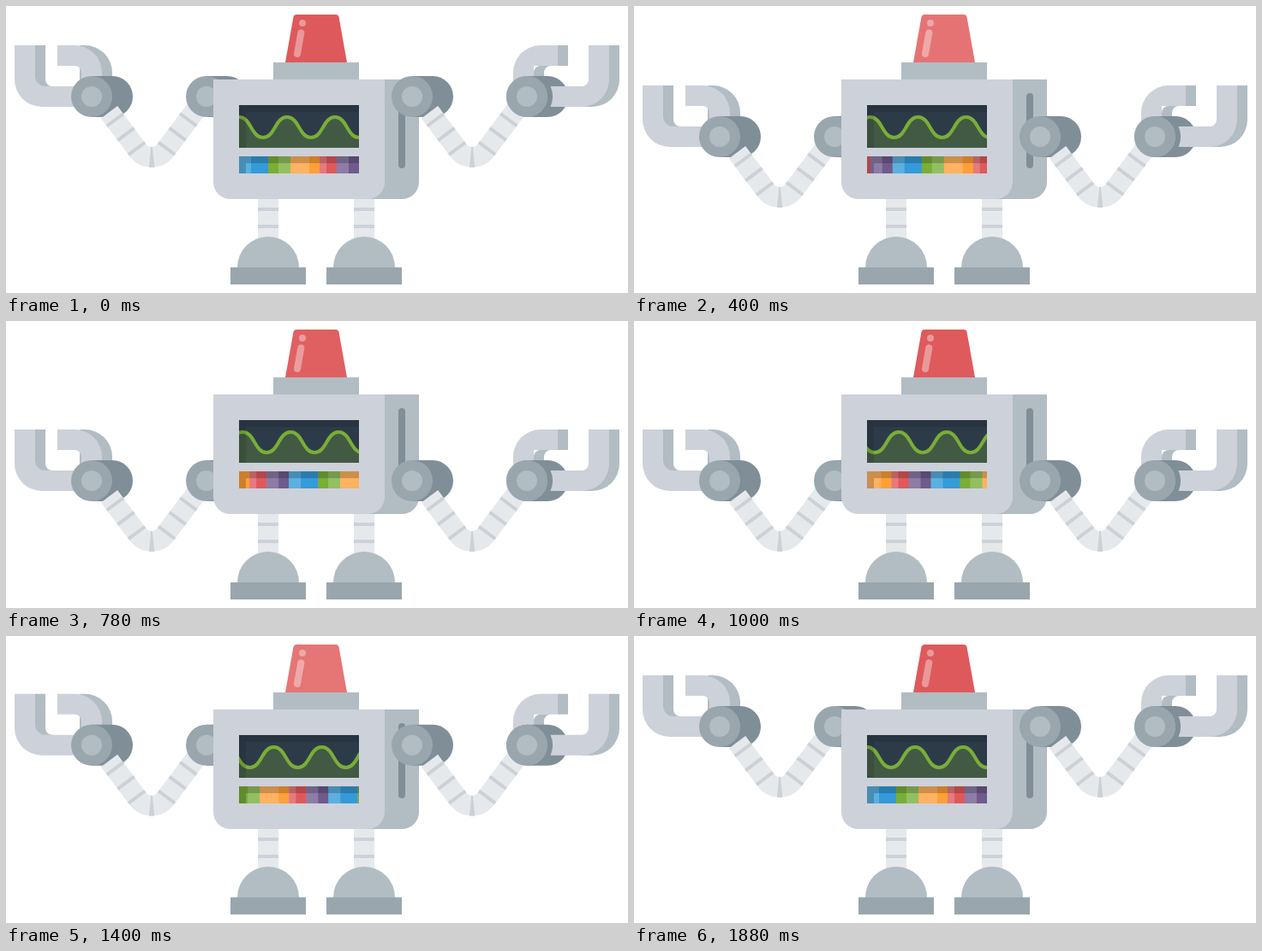
Recreate the animation shown at these times as an HTML page. Size 726 by 336 pixels, loop 1.9 s.

```html
<!DOCTYPE html>
<html lang="en">
<head>
<meta charset="utf-8">
<title>Robot</title>
<style>
  html, body { margin: 0; width: 100%; height: 100%; overflow: hidden; background: #fff; }
  svg { display: block; }
  .light { fill: #cdd1d9; }
  .mid { fill: #b2bcc3; }
  .steel { fill: #99a6ae; }
  .dark { fill: #808e98; }
</style>
</head>
<body>
<svg width="726" height="336" viewBox="0 0 726 336">
  <defs>
    <g id="leg">
      <path fill="#e6e9ec" d="M294 220h24v56h-24z"/>
      <path class="light" d="M294 236h24v4h-24zM294 256h24v4h-24z"/>
      <path class="mid" d="M270 306a36 36 0 0 1 72 0z"/>
      <path class="steel" d="M262 306h88v20h-88z"/>
    </g>
    <path id="pill" class="dark" d="M100 82h24a24 24 0 0 1 0 48h-24z"/>
    <g id="disc">
      <circle class="steel" cx="100" cy="106" r="24"/>
      <circle class="mid" cx="100" cy="106" r="12"/>
    </g>
    <path id="tube" d="M120.5 124.2L154 168.9A20 20 0 0 0 186 168.9L232 107.5"/>
    <g id="limb">
      <use href="#pill"/>
      <use href="#pill" x="134"/>
      <g fill="none" stroke-width="24">
        <use href="#tube" stroke="#e6e9ec"/>
        <use href="#tube" stroke="#cdd1d6" stroke-dasharray="4 17" stroke-dashoffset="-9.4"/>
      </g>
      <use href="#disc"/>
      <use href="#disc" x="134"/>
    </g>
  </defs>

  <g class="arm">
    <path class="mid" d="M34 46H46V86a8 8 0 0 0 8 8V100H34zM86 46H92a32 32 0 0 1 32 32V100H86z"/>
    <path class="light" d="M10 46H34V82a12 12 0 0 0 12 12H100V118H42a32 32 0 0 1-32-32z"/>
    <path class="light" d="M60 46H80a32 32 0 0 1 32 32V100H88V78a8 8 0 0 0-8-8H60z"/>
    <use href="#limb"/>
  </g>

  <use href="#leg"/>
  <use href="#leg" x="112"/>

  <path class="mid" d="M312 66h100v20h-100zM400 86h82v120a20 20 0 0 1-20 20h-62z"/>
  <path class="light" d="M242 86h200v120a20 20 0 0 1-20 20H262a20 20 0 0 1-20-20z"/>
  <rect class="dark" x="458" y="102" width="8" height="88" rx="4"/>

  <path id="lamp" d="M326 66L335.4 13.3Q336 10 339.4 10H384.6Q388 10 388.6 13.3L398 66z"/>
  <g fill="#fff" opacity=".38">
    <circle cx="346" cy="20" r="4"/>
    <path d="M344.3 31.5L340 56" stroke="#fff" stroke-width="8" stroke-linecap="round"/>
  </g>

  <svg x="272" y="116" width="140" height="50">
    <path fill="#2d3b49" d="M0 0h140v50H0z"/>
    <g id="wave">
      <path id="area" fill="#7aae37" fill-opacity=".27"/>
      <path id="line" fill="none" stroke="#7aae37" stroke-width="4"/>
    </g>
    <path opacity=".12" d="M0 0H140V8H8V50H0z"/>
  </svg>
  <svg x="272" y="176" width="140" height="20">
    <g id="bars"></g>
    <path opacity=".2" d="M0 0H140V8H8V20H0z"/>
  </svg>

  <g class="arm">
    <path class="light" d="M644 46H624a32 32 0 0 0-32 32V100H616V70H644z"/>
    <path class="mid" d="M644 46h12v24H636a8 8 0 0 0-8 8v12h-12V78a8 8 0 0 1 8-8h20z"/>
    <use href="#limb" x="374"/>
    <use href="#disc" x="508"/>
    <path class="mid" d="M704 46h12v40a32 32 0 0 1-32 32H672z"/>
    <path class="light" d="M680 46h24v40a32 32 0 0 1-32 32H635.5A30 30 0 0 0 635.5 94H672a8 8 0 0 0 8-8z"/>
  </g>
</svg>
<script>
const $ = id => document.getElementById(id);
const LOOP = 1900, CYCLE = 1880, HALF = CYCLE / 2, STEP = 20;

const curve = "M-112 14" + "c14 0 14 24 28 24s14-24 28-24".repeat(5);
$("line").setAttribute("d", curve);
$("area").setAttribute("d", curve + "V50H-112z");

const stripes = [
  [14, "#5ab0df"], [20, "#349bd8"], [12, "#79ae37"], [14, "#93bf60"], [22, "#ffb25f"],
  [12, "#ff9f37"], [8, "#e67a7c"], [12, "#df595c"], [14, "#8d7ca6"], [12, "#6f5a8c"]
];
let x = -140, rects = "";
for (const [w, color] of [...stripes, ...stripes]) {
  rects += `<rect x="${x}" width="${w + .5}" height="20" fill="${color}"/>`;
  x += w;
}
$("bars").innerHTML = rects;

// Arm height around its middle: a small wind-up, the swing, an overshoot and a settle.
const keys = [
  [0, -40], [60, -41], [120, -42.5], [155, -43], [200, -36], [300, -14], [400, 7],
  [540, 32.6], [580, 39.5], [620, 43], [680, 42.3], [780, 41], [HALF, 40]
];

function slope(i) {
  const a = keys[Math.max(i - 1, 0)], b = keys[Math.min(i + 1, keys.length - 1)];
  return (b[1] - a[1]) / (b[0] - a[0]);
}

function swing(t) {
  let i = 0;
  while (t > keys[i + 1][0]) i++;
  const [t0, a] = keys[i], [t1, b] = keys[i + 1], d = t1 - t0, u = (t - t0) / d;
  const m = slope(i) * d, n = slope(i + 1) * d;
  return a + u * (m + u * (3 * (b - a) - 2 * m - n + u * (2 * (a - b) + m + n)));
}

const shift = (el, x, y) => el.setAttribute("transform", `translate(${x.toFixed(2)} ${y.toFixed(2)})`);
const arms = document.querySelectorAll(".arm");

function draw(now) {
  const t = Math.floor(now % LOOP / STEP) * STEP % CYCLE;
  const y = t < HALF ? swing(t) : -swing(t - HALF);
  arms.forEach(arm => shift(arm, 0, y + 40));
  shift($("wave"), t * 280 / CYCLE % 56, 0);
  shift($("bars"), t * 140 / CYCLE, 0);
  const glow = (1 - Math.cos(2 * Math.PI * t / HALF)) / 2;
  $("lamp").setAttribute("fill", `rgb(${222 + 8 * glow},${89 + 28 * glow},${91 + 26 * glow})`);
}

const start = performance.now();
function tick() {
  draw(performance.now() - start);
  requestAnimationFrame(tick);
}
tick();
</script>
</body>
</html>
```
